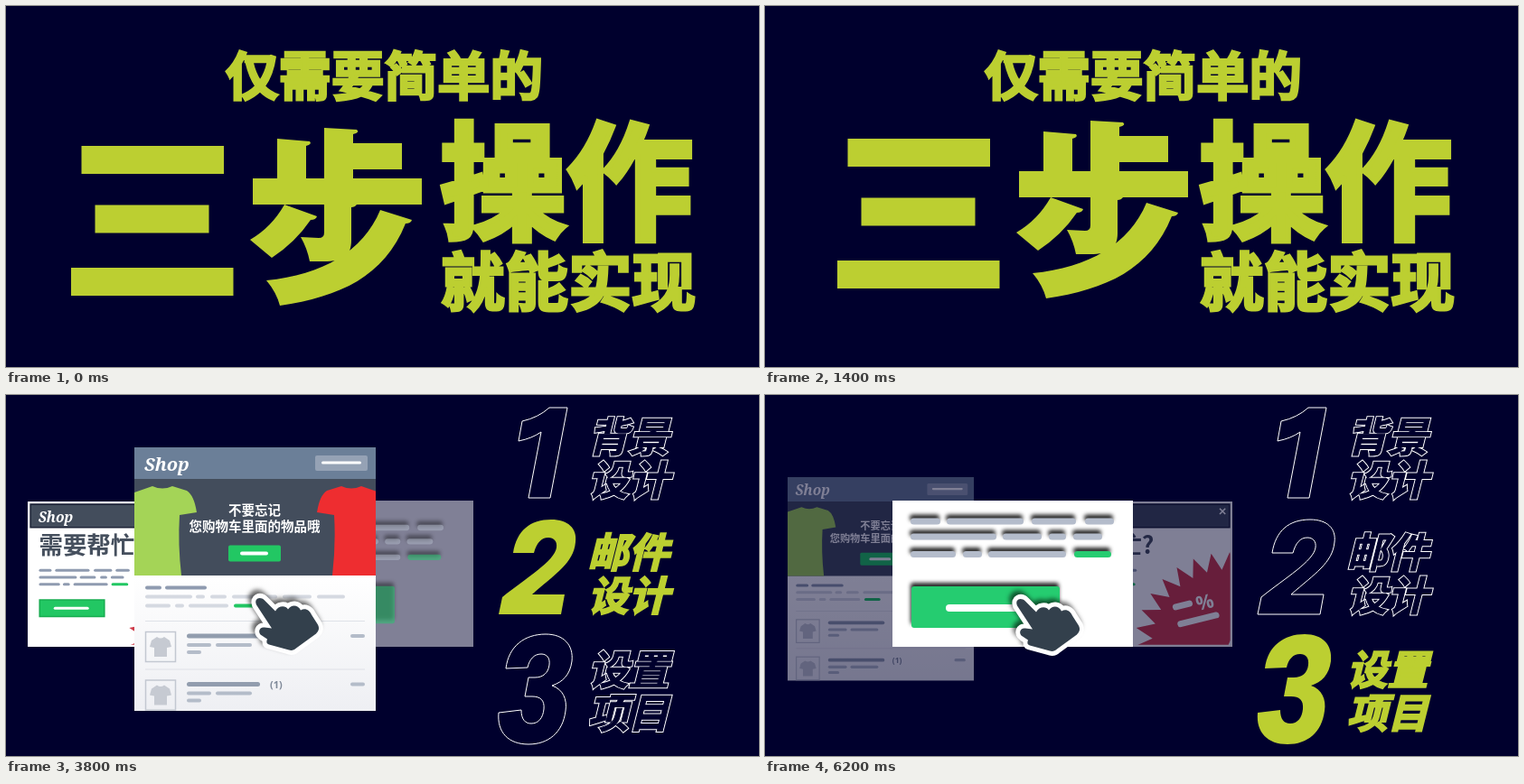
Write an HTML page with a canvas that moves like this. It is 833 by 400 pixels and loops after 6.7 s.

```html
<!DOCTYPE html>
<html lang="zh-CN">
<head>
<meta charset="utf-8">
<title>三步操作</title>
<style>
  html, body { margin: 0; width: 100%; height: 100%; overflow: hidden; background: #00002d; }
  canvas { display: block; }
</style>
</head>
<body>
<canvas id="stage" width="833" height="400"></canvas>
<script>
const ctx = document.getElementById('stage').getContext('2d');
const LOOP = 6700;
const NAVY = '#00002d', LIME = '#bccf31', SLATE = '#434d5c', GREY = '#8f9bb0', GREEN = '#22c763', WHITE = '#fff';
const CJK = '"Noto Sans CJK SC", "Noto Sans CJK JP", "Noto Sans CJK", sans-serif';

// ---- helpers ----
function rect(x1, y1, x2, y2, color, radius = 0) {
  ctx.fillStyle = color;
  ctx.beginPath();
  ctx.roundRect(x1, y1, x2 - x1, y2 - y1, radius);
  ctx.fill();
}

// extra thickens the strokes of the letters by that many pixels.
function text(str, x, y, size, color, { weight = 700, align = 'left', family = CJK, style = '', extra = 0 } = {}) {
  ctx.font = `${style} ${weight} ${size}px ${family}`;
  ctx.textAlign = align;
  ctx.fillStyle = ctx.strokeStyle = color;
  ctx.fillText(str, x, y);
  if (extra) {
    ctx.lineWidth = extra;
    ctx.miterLimit = 3;
    ctx.strokeText(str, x, y);
  }
}

// Round-ended bars on one row, given as start/end pairs.
function bars(y, height, color, ...ends) {
  for (let i = 0; i < ends.length; i += 2) {
    rect(ends[i], y - height / 2, ends[i + 1], y + height / 2, color, height / 2);
  }
}

function scoped(draw) {
  ctx.save();
  draw();
  ctx.restore();
}

function shadow(x, y, blur, color) {
  Object.assign(ctx, { shadowOffsetX: x, shadowOffsetY: y, shadowBlur: blur, shadowColor: color });
}

const shop = (x, y) => text('Shop', x, y, 20, WHITE, { family: '"Noto Serif", serif', style: 'italic' });

// ---- opening title ----
const STEP_GLYPH = new Path2D(
  'M300 147 L336 150 Q339 153 332 155 V191 H352 V135 L388 137 Q392 140 384 142 V152 H438 V181 H384 V191' +
  'H460 V220 H388 Q386 223 382 223 V260 C382 277 372 283 352 283 H336 Q333 268 326 256 L346 257 Q352 257 352 251 V220 H273 V191 H300Z' +
  'M308 220 L344 233 Q343 237 337 237 Q320 262 294 279 L270 259 Q294 245 308 220Z' +
  'M414 226 L449 237 Q448 241 442 241 C418 300 370 322 303 332 Q299 317 288 304 C350 298 395 272 414 226Z');
const SHAKE = [[0, 0], [-18, -12], [12, 21], [-12, 10], [8, -8]];

function title(t) {
  text('仅需要简单的', 243, 98.5, 58.5, LIME, { weight: 900, extra: 2.5 });
  text('操作', 480, 247, 140, LIME, { weight: 900, extra: 6 });
  text('就能实现', 481, 331.5, 70.5, LIME, { weight: 900, extra: 3 });
  scoped(() => {
    ctx.translate(...SHAKE[Math.floor(t / 100) % SHAKE.length]);
    rect(83.5, 155, 241, 186, LIME);
    rect(98.5, 220.5, 224.5, 251.5, LIME);
    rect(72, 290, 251.5, 321, LIME);
    ctx.fill(STEP_GLYPH);
  });
}

// ---- step list ----
const STEPS = [
  { words: ['背景', '设计'], y: 62.5, digit: new Path2D('M601 14 H621 L602 114 H578 L592 41 Q582 48 567 51 L571 29 Q589 25 601 14Z') },
  { words: ['邮件', '设计'], y: 190.5, digit: new Path2D(
    'M561 175 C565 150 580 138 603 138 C622 138 632 148 630 163 C628 186 608 198 582 221 H618 L614 243 H545 L549 224' +
    'C575 203 607 184 609 169 C610 162 606 158 600 158 C592 158 587 164 584 175Z') },
  { words: ['设置', '项目'], y: 320.5, digit: new Path2D(
    'M553 303 C556 278 574 265 597 265 C617 265 628 277 626 295 C624 310 616 318 604 322 C616 326 621 337 619 350' +
    'C616 374 600 387 578 387 C556 387 543 374 545 352 L570 349 C570 359 574 364 581 364 C589 364 594 358 595 348' +
    'C596 338 591 334 582 334 H574 L578 313 H585 C594 313 600 308 601 299 C602 291 598 287 592 287 C584 287 579 293 577 302Z') },
];

function stepList(active) {
  STEPS.forEach(({ words, y, digit }, i) => {
    const outlined = i !== active;
    ctx.strokeStyle = WHITE;
    ctx.fillStyle = LIME;
    ctx.lineWidth = 1;
    ctx[outlined ? 'stroke' : 'fill'](digit);
    words.forEach((word, row) => {
      const label = (color, extra) =>
        text(word, 643.5, y + row * 48.5, 45, color, { weight: 900, style: 'italic', extra });
      if (outlined) {
        label(WHITE, 3);
        label(NAVY, 1);
      } else {
        label(LIME, 2);
      }
    });
  });
}

// ---- cards ----
const popup = {
  x: 135, y: 95, w: 281, h: 207,
  draw() {
    rect(135, 95, 416, 302, WHITE);
    rect(138, 98, 413, 133, '#1c2236');
    rect(140, 100, 411, 131, SLATE);
    shop(150, 125);
    ctx.strokeStyle = WHITE;
    ctx.lineWidth = 2;
    ctx.stroke(new Path2D('M398 105 l8 8 m0 -8 l-8 8'));
    text('需要帮忙?', 151, 170, 34, '#46505e');
    bars(193, 4, GREY, 151, 169, 174, 223, 229, 255, 260, 280);
    bars(203, 4, GREY, 151, 205, 209, 232, 238, 248, 253, 272);
    bars(213, 4, GREY, 151, 181, 185, 195, 200, 249);
    bars(213, 4, GREEN, 254, 278);
    rect(151, 234, 245, 260, '#17ad50');
    rect(153, 236, 243, 258, GREEN);
    bars(247, 4, WHITE, 172, 222);
    scoped(() => {
      ctx.beginPath();
      ctx.rect(138, 133, 275, 166);
      ctx.clip();
      this.burst();
    });
  },
  burst() {
    ctx.beginPath();
    ctx.moveTo(410, 300);
    for (let i = -4; i <= 18; i++) {
      const angle = (-89 - i * 5.72) * Math.PI / 180, radius = i % 2 ? 108 : 133;
      ctx.lineTo(410 + radius * Math.cos(angle), 300 + radius * Math.sin(angle));
    }
    ctx.fillStyle = '#cf3c4a';
    ctx.fill();
    ctx.translate(367, 254);
    ctx.rotate(-0.24);
    bars(-16, 9, WHITE, -33, -4);
    bars(9, 9, WHITE, -32, 29);
    text('%', 13, -3, 28, WHITE, { align: 'center', family: '"Open Sans", sans-serif' });
  },
};

const SHIRT = new Path2D('M142 108 L162 101 Q173 106 184 101 L200 106 Q208 111 211 130 L192 133 Q190 165 194 200 H142Z');
const TINY_SHIRT = new Path2D('M-4 -11 Q0 -8 4 -11 L10 -7 L12 0 L7 1 L7 11 H-7 L-7 1 L-12 0 L-10 -7Z');

const email = {
  x: 142, y: 58, w: 267, h: 292,
  draw(hover) {
    const body = ctx.createLinearGradient(0, 200, 0, 350);
    body.addColorStop(0, WHITE);
    body.addColorStop(1, '#eeeff3');
    rect(142, 58, 409, 350, body);
    rect(142, 58, 409, 93, '#6b7f98');
    shop(153, 84);
    rect(342, 67, 400, 84, '#95a2b5', 2);
    bars(75, 3, WHITE, 349, 393);
    rect(142, 93, 409, 200, SLATE);
    ctx.fillStyle = '#a4d457';
    ctx.fill(SHIRT);
    scoped(() => {
      ctx.translate(555, 0);
      ctx.scale(-1, 1);
      ctx.fillStyle = '#ee2d30';
      ctx.fill(SHIRT);
    });
    text('不要忘记', 275, 133, 14.5, WHITE, { align: 'center' });
    text('您购物车里面的物品哦', 275, 151, 14.5, WHITE, { align: 'center' });
    scoped(() => {
      ctx.translate(275, 175.5);
      ctx.scale(hover, hover);
      rect(-29, -9, 29, 9, GREEN, 2);
      bars(0, 4, WHITE, -16, 15);
    });
    bars(213.5, 4, GREY, 154, 172, 176, 222);
    bars(223.5, 4, '#d5d9e1', 154, 206, 210, 220, 226, 244, 250, 300, 306, 338, 344, 375);
    bars(233.5, 4, '#d5d9e1', 154, 182, 187, 197, 202, 246);
    bars(233.5, 4, GREEN, 252, 275);
    this.item(262, '(3)');
    this.item(315.5, '(1)');
  },
  item(y, count) {
    rect(154, y - 12, 397, y - 11, '#dfe2e8');
    ctx.strokeStyle = '#c3c8d1';
    ctx.lineWidth = 1.5;
    ctx.strokeRect(154.5, y + .5, 33, 33);
    scoped(() => {
      ctx.translate(171, y + 17);
      ctx.fillStyle = '#c6cad2';
      ctx.fill(TINY_SHIRT);
    });
    bars(y + 5, 5, '#929dae', 200, 281);
    bars(y + 15, 4, '#b4bcc9', 200, 227, 232, 272);
    bars(y + 23, 4, '#b4bcc9', 200, 216);
    bars(y + 5, 4, '#b4bcc9', 381, 397);
    text(count, 292, y + 9, 11, '#7f8999', { family: '"Open Sans", sans-serif' });
  },
};

function place(card, x, y, scale = 1, { dim = false, hover = 1 } = {}) {
  scoped(() => {
    ctx.translate(x, y);
    ctx.scale(scale, scale);
    ctx.translate(-card.x, -card.y);
    ctx.beginPath();
    ctx.rect(card.x, card.y, card.w, card.h);
    ctx.clip();
    card.draw(hover);
    if (dim) rect(card.x, card.y, card.x + card.w, card.y + card.h, 'rgba(0,0,45,.5)');
  });
}

function settings(x, { scale = 1, dx = 0, dy = 0, alpha = 1, button = '#25cc70' } = {}) {
  scoped(() => {
    ctx.globalAlpha = alpha;
    rect(x, 117, x + 266, 279, WHITE);
    ctx.translate(dx, dy);
    ctx.scale(scale, scale);
    shadow(-1, -4, 4, 'rgba(0,0,0,.85)');
    const line = '#b4bccb';
    bars(140, 7, line, 161, 194, 201, 286, 295, 344, 354, 386);
    bars(157, 7, line, 161, 256, 263, 306, 314, 333, 341, 373);
    bars(176.5, 7, line, 161, 211, 219, 240, 247, 333);
    bars(176.5, 7, '#25cc70', 342, 383);
    rect(162, 212, 326, 258, button, 3);
    shadow(0, 0, 0, 'transparent');
    bars(236, 8, WHITE, 200, 285);
  });
}

// ---- pointing hand ----
const HAND = new Path2D(
  'M9 14 C6 7 13 4 18 9 L30 21 C33 15 41 14 44 19 C48 13 55 14 58 20 C63 17 68 20 70 25 L77 36 C79 40 78 43 75 46' +
  'L53 62 C51 64 48 65 45 64 L23 58 C20 57 20 55 21 52 L15 48 C10 45 12 38 18 39 L26 40Z');

// Each pose: start time, centre x, centre y, scale.
const POSES = [
  [1500, 285, 266, 1], [1700, 246, 282, 1], [1900, 246, 282, 1.17], [2100, 246, 282, 1], [2300, 285, 266, 1],
  [2800, 310, 254, 1], [3000, 316, 203, 1], [3200, 315, 201, 1.1], [3400, 316, 203, 1], [3600, 315, 218, 1], [3800, 310, 254, 1],
  [4300, 312, 255, 1], [5100, 330, 151, 1], [5200, 380, 165, 1], [5300, 380, 202, 1], [5400, 350, 214, 1], [5500, 313, 227, 1],
  [5600, 278, 239, 1], [5800, 278, 240, 1.17], [6000, 278, 239, 1], [6200, 312, 255, 1],
];

function handPose(t) {
  if (t >= 4500 && t < 5100) return [189 + 19.2 * Math.floor((t - 4500) / 100), 151, 1];
  return POSES.findLast(([start]) => start <= t).slice(1);
}

function hand(t) {
  const [x, y, scale] = handPose(t);
  scoped(() => {
    ctx.translate(x, y);
    ctx.scale(scale, scale);
    ctx.translate(-42, -35.5);
    ctx.lineJoin = 'round';
    ctx.lineWidth = 10;
    ctx.strokeStyle = WHITE;
    shadow(-3, -4, 5, 'rgba(0,0,0,.6)');
    ctx.stroke(HAND);
    shadow(0, 0, 0, 'transparent');
    ctx.fillStyle = '#33404c';
    ctx.fill(HAND);
  });
}

// ---- scenes ----
const during = (t, from, to) => t >= from && t < to;

function backgroundStep() {
  settings(21, { scale: .9, dx: -103.8, dy: 23, alpha: .5 });
  place(email, 311, 91, .772, { dim: true });
  place(popup, 135, 95);
}

function emailStep(t) {
  place(popup, 24, 118, .778, { dim: t < 3800 });
  settings(251, { scale: .9, dx: 136.6, dy: 21, alpha: .5 });
  place(email, 142, 58, 1, { hover: during(t, 3000, 3600) ? 1.45 : 1 });
}

function settingsStep(t) {
  place(email, 25, 91, .772, { dim: true });
  place(popup, 298.4, 118, .778, { dim: true });
  const pressed = during(t, 5800, 6000), hovered = during(t, 5600, 6200);
  settings(141, { button: pressed ? '#1cab5b' : hovered ? '#21bd67' : '#25cc70' });
}

function frame() {
  const t = performance.now() % LOOP;
  rect(0, 0, 833, 400, NAVY);
  if (t < 1500) {
    title(t);
  } else {
    const step = t < 2800 ? 0 : t < 4300 ? 1 : 2;
    [backgroundStep, emailStep, settingsStep][step](t);
    hand(t);
    stepList(step);
  }
  requestAnimationFrame(frame);
}
frame();
</script>
</body>
</html>
```
